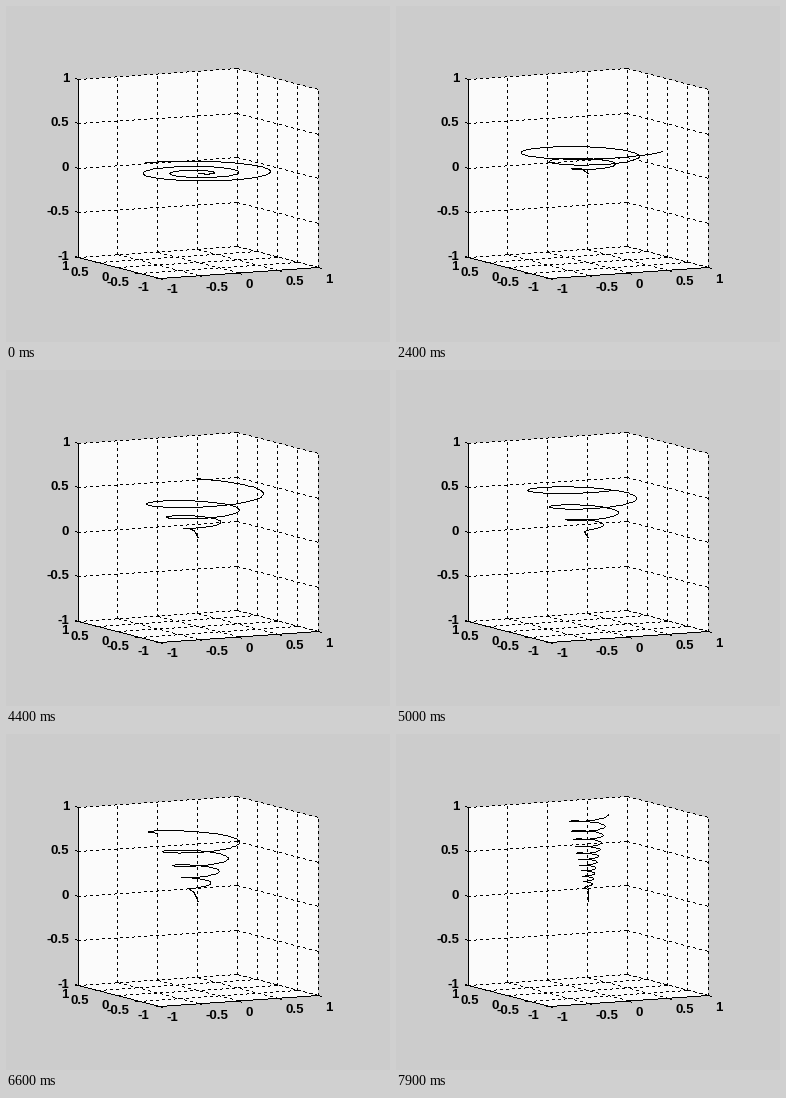
Write a matplotlib script that moves like this. It is 384x336 px and loops after 8000 ms.

```python
import numpy as np
import matplotlib.pyplot as plt
from matplotlib.animation import FuncAnimation
from matplotlib.collections import PolyCollection

W, H, DPI = 384, 336, 100
FRAMES, INTERVAL = 80, 100
TICKS = np.linspace(-1, 1, 5)
SQUARE = np.array([(-0.5, -0.5), (0.5, -0.5), (0.5, 0.5), (-0.5, 0.5)])

plt.rcParams["font.family"] = "Liberation Sans"
fig = plt.figure(figsize=(W / DPI, H / DPI), dpi=DPI, facecolor="#cccccc")
ax = fig.add_axes([0, 0, 1, 1])
ax.set_xlim(-0.5, W - 0.5)
ax.set_ylim(H - 0.5, -0.5)
ax.axis("off")


def project(x, y, z):
    """Orthographic view of the unit box, in pixels."""
    return np.stack([191.6 + 79.5 * x - 40.5 * y,
                     167 - 5.4 * x - 10.5 * y - 89 * z], axis=-1)


def trace(points):
    """Pixels of a hard-edged line, one pixel wide, through the points."""
    points = np.round(points)
    parts = [points[:1]]
    for a, b in zip(points[:-1], points[1:]):
        n = int(abs(b - a).max())
        parts.append(a + (b - a) * np.arange(1, n + 1)[:, None] / max(n, 1))
    return np.round(np.concatenate(parts))


def squares(pixels):
    return np.unique(pixels, axis=0)[:, None, :] + SQUARE


def pixel_layer(pixels):
    layer = PolyCollection(squares(pixels), facecolors="k", linewidths=0,
                           snap=False)
    ax.add_collection(layer, autolim=False)
    return layer


def wall(*corners):
    ax.fill(*zip(*(project(*c) for c in corners)), color="#fbfbfb", lw=0)


def solid(a, b):
    return trace(np.array([project(*a), project(*b)]))


def dashed(a, b):
    line = solid(a, b)
    return line[np.arange(len(line)) % 6 < 3]


def tick(point, dx, dy):
    p = project(*point)
    return trace(np.array([p, p + (dx, dy)]))


def label(point, value, dx, dy, ha):
    x, y = project(*point)
    ax.text(x + dx, y + dy, f"{value:g}", ha=ha, va="center_baseline",
            fontsize=13.3 * 72 / DPI, fontweight="bold", color="k")


def draw_box():
    wall((-1, 1, -1), (1, 1, -1), (1, 1, 1), (-1, 1, 1))
    wall((1, 1, -1), (1, -1, -1), (1, -1, 1), (1, 1, 1))
    wall((-1, 1, -1), (1, 1, -1), (1, -1, -1), (-1, -1, -1))
    lines = [solid((-1, 1, -1), (-1, 1, 1)),
             solid((-1, 1, -1), (-1, -1, -1)),
             solid((-1, -1, -1), (1, -1, -1))]
    for v in TICKS:
        lines += [dashed((v, 1, -1), (v, 1, 1)),
                  dashed((v, -1, -1), (v, 1, -1)),
                  dashed((1, v, -1), (1, v, 1)),
                  dashed((-1, v, -1), (1, v, -1)),
                  dashed((-1, 1, v), (1, 1, v)),
                  dashed((1, 1, v), (1, -1, v)),
                  tick((v, -1, -1), 3, 1),
                  tick((-1, v, -1), -3, 0),
                  tick((-1, 1, v), -3, -1)]
        label((v, -1, -1), v, 7, 10.5, "left")
        label((-1, v, -1), v, -9.5, 8.5, "right")
        label((-1, 1, v), v, -9, -2, "right")
    pixel_layer(np.concatenate(lines))


# Winding: a straight start, then turns that open out towards the rim.
rho = np.linspace(0, 1, 301)
rate = (3.15 - 2.05 * rho ** 2) * np.clip((rho - 0.1) / 0.1, 0, 1)
unwind = np.cumsum(rate[::-1])[::-1] * (rho[1] - rho[0])
unwind -= unwind[-1]


def cone(n):
    """Spiral on a cone whose rim lies on the unit sphere."""
    z = 0.015 + 0.01214 * n
    radius = np.sqrt(1 - z * z)
    # Narrower cones wind faster; each one is also turned from the last.
    end = 126 - 80.4 * n - 495 * (1 / radius - 1)
    angle = np.radians(end - 27 - 442 / radius * unwind)
    r = rho * radius
    return project(r * np.cos(angle), r * np.sin(angle), rho * z)


draw_box()
curve = pixel_layer(trace(cone(0)))


def update(n):
    curve.set_verts(squares(trace(cone(n))))
    return curve,


anim = FuncAnimation(fig, update, frames=FRAMES, interval=INTERVAL,
                     repeat=True, repeat_delay=0)
plt.show()
```
